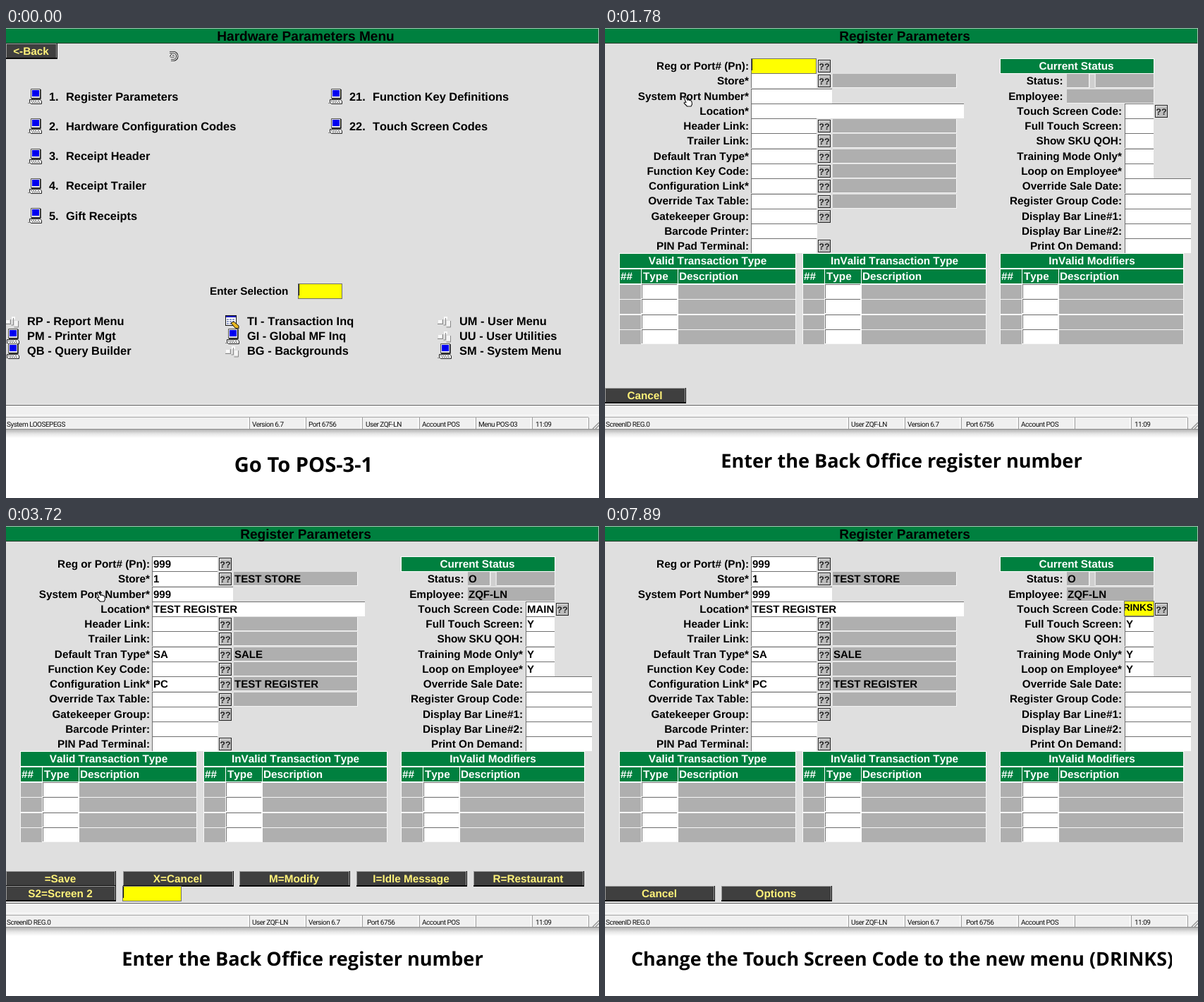
An HTML page for the animation above (8000 ms loop, 841x666 px).

```html
<!DOCTYPE html>
<html lang="en">
<head>
<meta charset="utf-8">
<title>Register setup</title>
<style>
  html, body { margin: 0; width: 100%; height: 100%; overflow: hidden; background: #fff; }
  svg { display: block; }
  #stage { width: 841px; height: 666px; }
  rect { shape-rendering: crispEdges; }
  text {
    font: bold 15.3px "Liberation Sans", Arial, sans-serif;
    font-kerning: none; white-space: pre; text-rendering: geometricPrecision;
  }
  .title { font-size: 19.1px; }
  .menu { font-size: 16.4px; }
  .value { font-size: 15px; }
  .edit { font-size: 13.6px; }
  .ask { font-size: 12.5px; }
  .status { font: 10px Roboto, Arial, sans-serif; letter-spacing: -.5px; }
  .caption { font-family: "Open Sans", "Noto Sans", sans-serif; font-kerning: normal; }
</style>
</head>
<body>
<svg id="stage" viewBox="0 0 841 666" xmlns="http://www.w3.org/2000/svg">
  <defs>
    <linearGradient id="shade" x2="0" y2="1">
      <stop offset="0" stop-color="#b4b4b4"/><stop offset=".5" stop-color="#e6e6e6"/><stop offset="1" stop-color="#fff"/>
    </linearGradient>
  </defs>
</svg>
<script>
const LOOP = 8000, BLINK = 530;
const GREEN = '#00803f', GRAY = '#afafaf', FACE = '#dfdfdf', YELLOW = '#ff0', GOLD = '#fff27a', EDGE = '#707070';
const stage = document.getElementById('stage');
const cues = [];
let parent = stage;

function el(tag, attrs = {}, content) {
  const node = document.createElementNS('http://www.w3.org/2000/svg', tag);
  for (const k in attrs) node.setAttribute(k, attrs[k]);
  if (content !== undefined) node.textContent = content;
  return parent.appendChild(node);
}
const rect = (x, y, width, height, fill) => el('rect', { x, y, width, height, fill });
const path = (d, attrs) => el('path', { d, fill: 'none', ...attrs });
const text = (x, y, s, cls = '', fill = '#000', anchor = 'start') =>
  el('text', { x, y, class: cls, fill, 'text-anchor': anchor }, s);

function inside(node, draw) {
  const outer = parent;
  parent = node;
  draw();
  parent = outer;
  return node;
}
const group = draw => inside(el('g'), draw);
const during = (from, to, draw) => cues.push({ node: group(draw), from, to });

function sunken(x, y, w, h, fill) {
  rect(x, y, w, h, EDGE);
  rect(x + 1, y + 1, w - 1, h - 1, fill);
}
function framed(x, y, w, h, fill) {
  rect(x, y, w, h, EDGE);
  rect(x + 1, y + 1, w - 2, h - 2, fill);
}
function readOnly(x, y, w, h) {
  rect(x, y, w, h, '#f4f4f4');
  rect(x, y, w - 1, h - 1, GRAY);
}
function header(x, y, w, h) {
  rect(x, y, w, h, '#fff');
  rect(x + 1, y + 1, w - 2, h - 2, GREEN);
}
function button(x, y, w, label) {
  rect(x, y, w, 22, '#0a0a0a');
  rect(x, y, w - 1, 20, '#9a9a9a');
  rect(x + 1, y + 1, w - 3, 19, '#3f3f3f');
  text(x + w / 2 - 1, y + 15.5, label, '', GOLD, 'middle');
}
function ask(x, y) {
  rect(x, y, 18, 18, '#222');
  rect(x + 1, y + 1, 16, 16, '#e8e8e8');
  rect(x + 2, y + 2, 15, 15, '#bdbdbd');
  text(x + 9, y + 13.5, '??', 'ask', '#222', 'middle');
}
function titleBar(s) {
  rect(0, 0, 841, 22, '#a8c4b4');
  rect(0, 1, 840, 21, '#1d3a2a');
  rect(0, 1, 840, 20, GREEN);
  text(425, 18.3, s, 'title', '#000', 'middle');
}
function caption(s, x, y, size) {
  inside(el('svg', { width: 804, height: 666 }), () =>
    text(x, y, s, 'caption', '#000', 'middle').style.fontSize = size + 'px');
}

// Icons
const icon = (x, y, draw) => inside(el('g', { transform: `translate(${x} ${y})` }), draw);

const computer = (x, y) => icon(x, y, () => {
  path('M4.5 .5h13v13h-13z', { fill: '#e4e4e4', stroke: '#555' });
  path('M18 1v13H5', { stroke: '#111', 'stroke-width': 1.4 });
  rect(6, 2, 10, 9, '#0000f0');
  path('M2.5 15.5h15l2 2v4H4.5l-2 -2z', { fill: '#efefef', stroke: '#222' });
  path('M4 17.5h8M14 17.5h3M6 19.5h12', { stroke: '#666', 'stroke-dasharray': '2 1' });
  path('M0 20.5h3', { stroke: '#888' });
});
const network = (x, y) => icon(x, y, () => {
  rect(1, 7, 5, 4, '#fafafa');
  rect(9, 2, 5, 4, '#fafafa');
  rect(13, 8, 5, 7, '#f4f4f4');
  path('M0 12.5h8M7.5 6v7M11.5 4v10h-3M18.5 8v9h-6', { stroke: '#888' });
});
const sheet = (x, y) => icon(x, y, () => {
  rect(0, 0, 16, 15, '#111');
  rect(1, 3, 14, 11, '#fff');
  rect(1, 1, 14, 2, '#0000c0');
  path('M2 6h12M2 9h12M2 12h8', { stroke: '#223a90', 'stroke-dasharray': '3 1' });
  path('M8 11l4 -2 7 6v4l-5 -1z', { fill: '#e8b820', stroke: '#111' });
});

// Window frame and status bar
rect(0, 0, 841, 534, FACE);
rect(0, 569, 841, 12, 'url(#shade)');
rect(0, 533, 841, 1, '#f4f4f4');
rect(0, 534, 841, 35, '#f0f0f0');
rect(0, 534, 841, 1, '#5a5a5a');
rect(0, 548, 841, 1, '#fafafa');
rect(0, 551, 826, 1, '#a8a8a8');
for (let i = 0; i < 7; i++) {
  const x = Math.round(345 + 80.2 * i);
  rect(x - 2, 552, 1, 16, '#fff');
  rect(x, 552, 1, 16, '#a0a0a0');
}
rect(0, 568, 841, 1, '#8c8c8c');
path('M832 568l9 -9M836 568l5 -5', { stroke: '#909090', 'stroke-width': 1.3 });

const status = cells => cells.forEach(([x, s]) => text(x, 564.7, s, 'status', '#111'));

// Menu screen
during(0, 1620, () => {
  titleBar('Hardware Parameters Menu');
  button(0, 22, 73, '<-Back');
  const item = (x, row, n, label) => {
    const y = 102.5 + 42.3 * row;
    computer(x - 30, Math.round(y - 16.5));
    text(x, y, n + '.', 'menu');
    text(x + (n > 9 ? 33 : 24), y, label, 'menu');
  };
  ['Register Parameters', 'Hardware Configuration Codes', 'Receipt Header', 'Receipt Trailer', 'Gift Receipts']
    .forEach((s, i) => item(61, i, i + 1, s));
  ['Function Key Definitions', 'Touch Screen Codes'].forEach((s, i) => item(487, i, i + 21, s));
  text(289, 378, 'Enter Selection');
  [
    [30, ['RP - Report Menu', network], ['PM - Printer Mgt', computer], ['QB - Query Builder', computer]],
    [342, ['TI - Transaction Inq', sheet], ['GI - Global MF Inq', computer], ['BG - Backgrounds', network]],
    [643, ['UM - User Menu', network], ['UU - User Utilities', network], ['SM - System Menu', computer]]
  ].forEach(([x, ...rows]) => rows.forEach(([s, picture], i) => {
    const y = 421 + 21.2 * i;
    picture(x - 31, Math.round(y - (picture === computer ? 16 : 14)));
    text(x, y, s, 'menu');
  }));
  status([[1, 'System LOOSEPEGS'], [349, 'Version 6.7'], [429, 'Port 6756'], [510, 'User ZQF-LN'],
    [590, 'Account POS'], [670, 'Menu POS-03'], [751, '11:09']]);
});

// Form screen
const rowY = i => Math.round(43 + 21.28 * i);
const base = i => 59 + 21.25 * i;

function table(x, w, label) {
  header(x, 319, w, 22);
  text(x + w / 2, 335.3, label, '', '#fff', 'middle');
  header(x, 341, w, 22);
  [['##', 2], ['Type', 34], ['Description', 85]].forEach(([s, dx]) => text(x + dx, 357, s, '', '#fff'));
  rect(x, 363, w, 85, '#f6f6f6');
  for (let r = 0; r < 4; r++) {
    const y = Math.round(363 + 21.3 * r);
    rect(x + 1, y + 1, 30, 20, GRAY);
    sunken(x + 32, y, 50, 20, '#fff');
    rect(x + 84, y + 1, w - 85, 20, GRAY);
  }
  rect(x + 31, 342, 1, 106, '#fff');
  rect(x + 83, 342, 1, 106, '#fff');
}

during(1620, LOOP, () => {
  titleBar('Register Parameters');
  // label, right edge of field, lookup button, description
  [
    ['Reg or Port# (Pn):', 300, 1], ['Store*', 300, 1, 1], ['System Port Number*', 322], ['Location*', 509],
    ['Header Link:', 300, 1, 1], ['Trailer Link:', 300, 1, 1], ['Default Tran Type*', 300, 1, 1],
    ['Function Key Code:', 300, 1, 1], ['Configuration Link*', 300, 1, 1], ['Override Tax Table:', 300, 1, 1],
    ['Gatekeeper Group:', 300, 1], ['Barcode Printer:', 301], ['PIN Pad Terminal:', 300, 1]
  ].forEach(([s, right, lookup, desc], i) => {
    text(204, base(i), s, '', '#000', 'end');
    sunken(207, rowY(i), right - 207, 21, '#fff');
    if (lookup) ask(302, rowY(i) + 2);
    if (desc) readOnly(323, rowY(i) + 1, 176, 20);
  });

  header(560, 43, 219, 22);
  text(668.5, 59, 'Current Status', '', '#fff', 'middle');
  text(649.5, base(1), 'Status:', '', '#000', 'end');
  text(649.5, base(2), 'Employee:', '', '#000', 'end');
  readOnly(655, 65, 32, 20);
  rect(688, 66, 6, 19, '#cfcfcf');
  readOnly(696, 65, 83, 20);
  readOnly(655, 87, 124, 20);
  ['Touch Screen Code:', 'Full Touch Screen:', 'Show SKU QOH:', 'Training Mode Only*', 'Loop on Employee*',
    'Override Sale Date:', 'Register Group Code:', 'Display Bar Line#1:', 'Display Bar Line#2:', 'Print On Demand:'
  ].forEach((s, i) => {
    text(733, base(i + 3), s, '', '#000', 'end');
    sunken(737, rowY(i + 3), i < 5 ? 41 : 94, 21, '#fff');
  });
  ask(780, 109);

  table(20, 251, 'Valid Transaction Type');
  table(280, 261, 'InValid Transaction Type');
  table(560, 261, 'InValid Modifiers');
  status([[1, 'ScreenID REG.0'], [349, 'User ZQF-LN'], [429, 'Version 6.7'], [512, 'Port 6756'],
    [590, 'Account POS'], [751, '11:09']]);
});

const values = list => list.forEach(([x, row, s]) => text(x, base(row), s, 'value'));
during(1620, 3560, () => button(0, 510, 115, 'Cancel'));
during(3490, LOOP, () => values([[209, 0, '999']]));
during(3560, LOOP, () => values([
  [209, 1, '1'], [324, 1, 'TEST STORE'], [209, 2, '999'], [209, 3, 'TEST REGISTER'], [209, 6, 'SA'], [324, 6, 'SALE'],
  [209, 8, 'PC'], [324, 8, 'TEST REGISTER'], [656, 1, 'O'], [656, 2, 'ZQF-LN'], [739, 3, 'MAIN'],
  [739, 4, 'Y'], [739, 6, 'Y'], [739, 7, 'Y']
]));
during(3640, 5270, () => {
  ['=Save', 'X=Cancel', 'M=Modify', 'I=Idle Message', 'R=Restaurant']
    .forEach((s, i) => button(Math.round(165.7 * i), 489, i ? 157 : 156, s));
  button(0, 510, 156, 'S2=Screen 2');
});
during(5420, LOOP, () => {
  button(0, 510, 156, 'Cancel');
  button(165, 510, 157, 'Options');
});
during(5580, 6040, () => {
  framed(736, 106, 43, 22, YELLOW);
  rect(737, 107, 35, 16, '#0078d7');
  text(737.5, 120, 'MAIN', 'edit', '#fff');
});

during(0, 1700, () => caption('Go To POS-3-1', 422, 629, 29.1));
during(1700, 3790, () => caption('Enter the Back Office register number', 420.5, 622.6, 27.1));
during(3790, LOOP, () => caption('Change the Touch Screen Code to the new menu (DRINKS)', 421.5, 622.6, 26.85));

// Active inputs: typed text, blinking caret, scrolling when too long
const inputs = [
  { x: 414, y: 362, w: 63, h: 22, from: 0, to: 1470 },
  { x: 207, y: 43, w: 93, h: 22, from: 1780, to: 3490, word: '999', keys: [2630, 2780, 3010] },
  { x: 165, y: 510, w: 84, h: 22, from: 3720, to: 5270 },
  { x: 736, y: 106, w: 43, h: 22, from: 6040, to: LOOP, word: 'DRINKS', keys: [6040, 6350, 6580, 6880, 7130, 7360] }
];
inputs.forEach(f => during(f.from, f.to, () => {
  framed(f.x, f.y, f.w, f.h, YELLOW);
  inside(el('svg', { x: f.x + 1, y: f.y + 1, width: f.w - 2, height: f.h - 2 }), () => {
    f.label = text(.5, 13, '', 'edit');
    f.caret = rect(0, 0, 1, 16, '#001');
  });
}));

function updateInput(f, t) {
  const hit = (f.keys || []).filter(k => t >= k);
  const s = (f.word || '').slice(0, hit.length);
  if (f.label.textContent !== s) f.label.textContent = s;
  const width = s ? f.label.getComputedTextLength() : 0;
  const x = Math.min(.5, f.w - 3 - width);
  f.label.setAttribute('x', x);
  f.caret.setAttribute('x', Math.floor(x + width));
  const since = t - (hit.pop() ?? f.from);
  f.caret.style.visibility = Math.floor(since / BLINK) % 2 ? 'hidden' : 'inherit';
}

// Pointers
const curl = group(() => {
  const d = 'M2 3.5H7.5a4.6 4.8 0 0 1 0 11H4M8.5 9H4L6 6.5';
  path(d, { stroke: '#000', 'stroke-width': 3.2, 'stroke-linejoin': 'round' });
  path(d, { stroke: '#fff', 'stroke-width': 1.4 });
});
const hand = group(() => path(
  'M1 1.5Q2.5 0 4 2L6 5.2Q8 4 9 5.6 11 5 12 7.5L12.5 11 11 14H5.5L1.2 9.5Q1 7.5 4 8.6Z',
  { fill: '#fff', stroke: '#111', 'stroke-width': 1.1, 'stroke-linejoin': 'round' }));
const busy = group(() => {
  el('circle', { cx: 111, cy: 99, r: 6, fill: '#a8d8f8', stroke: '#1f8ce0', 'stroke-width': 4.4 });
  path('M106 96a6 6 0 0 1 8 -2', { stroke: '#58b4f4', 'stroke-width': 3 });
});

const stepped = (t, from, to, n) =>
  t < from ? 0 : Math.min(1, (Math.floor((t - from) / (to - from) * (n - 1) + 1e-6) + 1) / n);

function pointer(t) {
  if (t < 1470) {
    const k = stepped(t, 850, 1240, 6);
    return [k < .5 ? curl : hand, 230 - 119 * k, 31 + 66 * k];
  }
  if (t < 1540) return [];
  if (t < 1700) return [busy, 0, 0];
  if (t < 2010) return [hand, 111, 97];
  if (t < 2630) return [hand, 128, 93];
  if (t < 3720) return [];
  if (t < 6040) {
    const k = stepped(t, 4510, 5120, 9);
    return [hand, 128 + 629 * k, 93 + 16 * k - 34 * Math.sin(Math.PI * k)];
  }
  return [];
}

function frame() {
  const t = performance.now() % LOOP;
  for (const c of cues) c.node.style.visibility = t >= c.from && t < c.to ? 'visible' : 'hidden';
  for (const f of inputs) if (t >= f.from && t < f.to) updateInput(f, t);
  const [shape, x, y] = pointer(t);
  for (const p of [curl, hand, busy]) p.style.visibility = p === shape ? 'visible' : 'hidden';
  if (shape) shape.setAttribute('transform', `translate(${Math.round(x)} ${Math.round(y)})`);
  requestAnimationFrame(frame);
}
frame();
</script>
</body>
</html>
```
